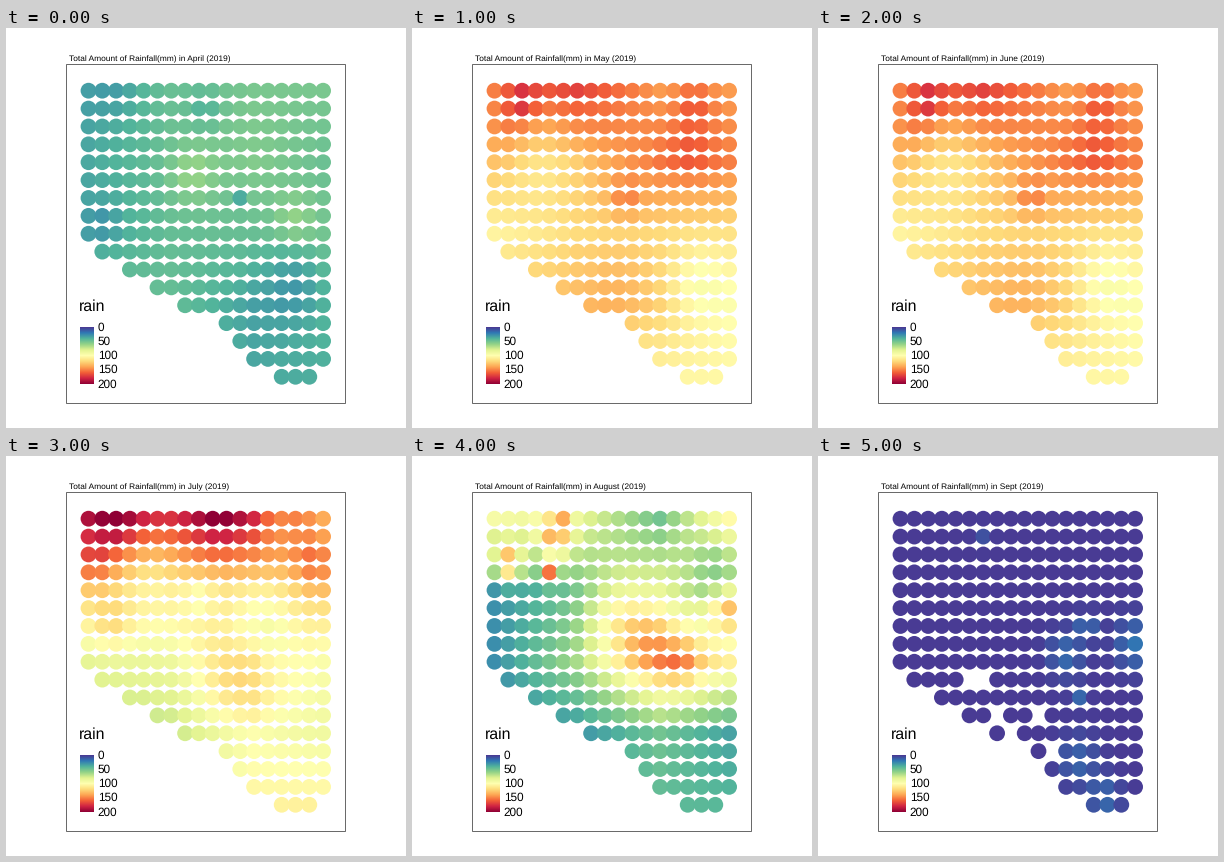
Animation of 400 by 400 pixels, one loop 6 s. Source, as a matplotlib script:

```python
import matplotlib.pyplot as plt
import numpy as np
from matplotlib.animation import FuncAnimation
from matplotlib.colors import LinearSegmentedColormap
from matplotlib.patches import Rectangle

DPI, SIZE = 100, 400
PX = 72 / DPI                      # points per pixel
plt.rcParams["font.family"] = "Liberation Sans"
plt.rcParams["text.hinting"] = "none"

SPECTRAL = LinearSegmentedColormap.from_list("rain", [
    "#4a3893", "#2f79b5", "#52b49b", "#94d387", "#e2f391", "#ffffb0",
    "#fedc7c", "#fda653", "#f36038", "#d02443", "#8f0035"], N=512)

# The lower left corner is cut off; the last row also ends one column early.
FIRST = [0] * 9 + [1, 3, 5, 7, 10, 11, 12, 14]
COLS = 18
CELLS = [(c, r) for r, first in enumerate(FIRST)
         for c in range(first, COLS - (r == 16))]
DRY = {(5, 9), (6, 9), (7, 11), (10, 11), (8, 12), (11, 13)}

# Broad rainfall trend at a few columns and rows, blended in between.
KEY_COLS = (0, 6, 12, 17)
KEY_ROWS = (0, 4, 8, 12, 16)


class Month:
    """A smooth trend plus local showers given as (col, row, mm, spread)."""

    def __init__(self, name, trend, showers, dry=()):
        self.name, self.showers = name, showers
        self.trend = np.array(trend)
        self.cells = [cell for cell in CELLS if cell not in dry]

    def rain(self):
        return np.array([self.rain_at(c, r) for c, r in self.cells])

    def rain_at(self, c, r):
        across = [np.interp(c, KEY_COLS, row) for row in self.trend]
        mm = np.interp(r, KEY_ROWS, across)
        for col, row, extra, spread in self.showers:
            dist2 = (c - col) ** 2 + (r - row) ** 2
            mm += extra * np.exp(-dist2 / (2 * spread ** 2))
        return np.clip(mm, 0, 200)


APRIL = Month(
    "April",
    [(34, 47, 52, 52), (36, 48, 55, 48), (34, 46, 47, 50),
     (50, 46, 34, 42), (50, 45, 36, 38)],
    [(7.5, 4.7, 12, 1.1), (15, 7.2, 11, 1), (15, 10.6, -11, 1.5),
     (11, 6, -13, 0.4), (2, 0, -6, 1.2), (8.5, 1, -9, 0.8),
     (1.2, 7.3, -7, 0.8)])

WET_SPELL = (
    [(150, 170, 143, 143), (130, 130, 152, 150), (106, 120, 121, 117),
     (125, 132, 124, 102), (110, 108, 105, 104)],
    [(2, 0.6, 24, 0.8), (14.5, 0.7, 17, 0.9), (14.3, 3.3, 13, 1.2),
     (3.5, 4, -15, 1.7), (1, 2, 10, 1), (9.5, 6, 19, 0.8),
     (9, 11, 8, 1.6), (14.8, 10.7, -17, 1.5)])
MAY = Month("May", *WET_SPELL)
JUNE = Month("June", *WET_SPELL)

JULY = Month(
    "July",
    [(186, 176, 178, 136), (122, 118, 122, 122), (83, 88, 118, 97),
     (68, 72, 96, 90), (70, 70, 106, 108)],
    [(2, 0.3, 22, 1.1), (9.4, 0, 24, 1.4), (13.5, 0, -14, 0.9),
     (0.5, 2.5, 18, 0.9), (16.4, 2.5, 26, 1.1), (4.5, 2.8, -18, 1.5),
     (8, 4.3, -18, 0.9), (1.7, 6, 17, 1), (12.5, 6, -26, 1.8),
     (10.5, 9, 19, 1.7)])

AUGUST = Month(
    "August",
    [(94, 84, 50, 104), (28, 50, 82, 60), (27, 64, 126, 108),
     (24, 28, 50, 34), (30, 35, 44, 42)],
    [(1, 2.5, 88, 0.65), (4.4, 1, 64, 0.8), (4, 3, 98, 0.4),
     (5, 0, 30, 0.4), (16, 2.5, -18, 1.2), (9, 5.5, 30, 1.6),
     (17, 5, 58, 0.9), (11, 7, 28, 1.2), (13.5, 8, 32, 1)])

SEPT = Month(
    "Sept",
    np.ones((5, 4)),
    [(6, 1, 7, 0.4), (13.5, 6, 16, 0.5), (12, 7.6, 15, 0.9),
     (17, 7, 18, 1), (13, 10, 13, 0.4), (12.9, 13.5, 13, 1),
     (14.8, 15.6, 15, 0.8)],
    DRY)

MONTHS = [APRIL, MAY, JUNE, JULY, AUGUST, SEPT]


def label(x, y, text, px):
    return ax.text(x, y, text, fontsize=px * PX, color="black",
                   ha="left", va="baseline")


fig = plt.figure(figsize=(SIZE / DPI, SIZE / DPI), dpi=DPI, facecolor="white")
ax = fig.add_axes([0, 0, 1, 1])
ax.axis("off")

ax.add_patch(Rectangle((60.5, 36.5), 279, 339, fill=False,
                       ec="#6a6a6a", lw=PX, snap=False))
title = label(63, 33, "", 8.33)

# Legend
label(73, 283, "rain", 15.9)
ax.imshow(np.linspace(0, 1, 200)[:, None], cmap=SPECTRAL, aspect="auto",
          extent=(74, 88, 356, 299), interpolation="bilinear")
for i in range(5):
    label(91.8, 303.2 + 14.05 * i, str(50 * i), 11.7)

dots = ax.scatter([], [], s=(15.8 * PX) ** 2, linewidths=0, zorder=3)
ax.set(xlim=(0, SIZE), ylim=(SIZE, 0))


def draw(i):
    month = MONTHS[i]
    dots.set_offsets([(82.5 + 13.8 * c, 62.7 + 17.88 * r)
                      for c, r in month.cells])
    dots.set_facecolors(SPECTRAL(month.rain() / 200))
    title.set_text(f"Total Amount of Rainfall(mm) in {month.name} (2019)")
    return dots, title


anim = FuncAnimation(fig, draw, frames=len(MONTHS), interval=1000,
                     repeat=True, repeat_delay=0)
plt.show()
```
